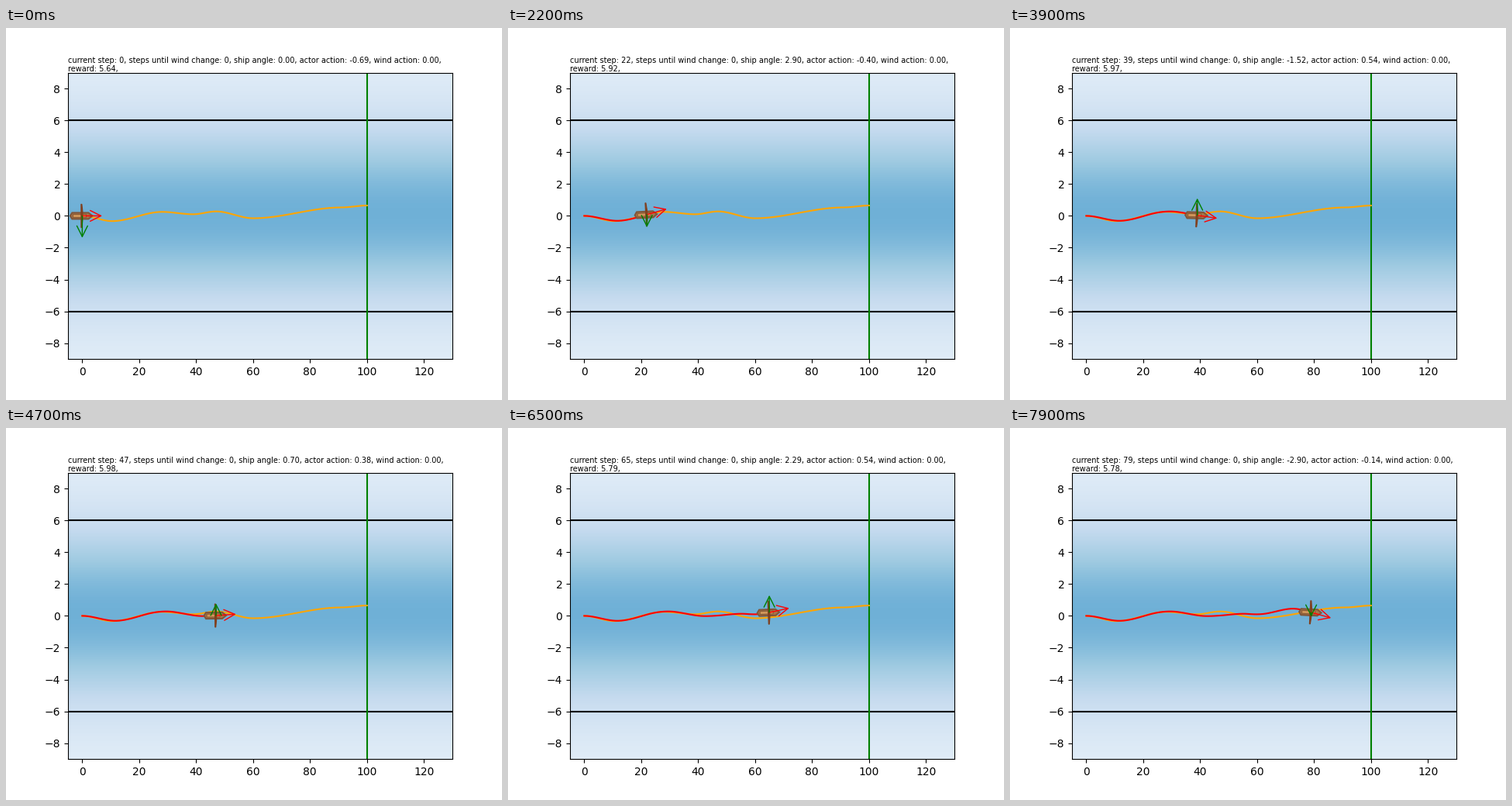
Animation, 640 px wide and 480 px high, one loop 8000 ms. Source, as a matplotlib script:

```python
import numpy as np
import matplotlib.pyplot as plt
from matplotlib.animation import FuncAnimation
from matplotlib.patches import FancyArrowPatch, Polygon

STEPS = 80
PX = np.array([135 / 496, 18 / 369.6])  # data units per pixel

# Key poses: step, height, heading in degrees, rudder action
KEYS = np.array([
    (0, 0, 0, -.69), (12, -.31, .27, .55), (22, .08, 2.9, -.4),
    (32, .25, -1.29, -.86), (40, .01, -1.2, .6), (47, .02, .7, .38),
    (57, .12, -.83, -.7), (63, .14, 1.6, .7), (72, .45, .59, -.53),
    (79, .22, -2.9, -.14)])

# Turning points of the planned route
TURNS = np.array([(0, 0), (10.5, -.33), (28, .25), (39, .1), (47, .28),
                  (60, -.15), (91, .53), (100, .65)])


def curve(t, x, y, slope=None):
    """Cubic through (x, y); without slopes it eases from point to point."""
    m = np.zeros(len(x)) if slope is None else slope
    i = np.clip(np.searchsorted(x, t, side="right") - 1, 0, len(x) - 2)
    h = x[i + 1] - x[i]
    u = (t - x[i]) / h
    rise, p, q = y[i + 1] - y[i], m[i] * h, m[i + 1] * h
    c2, c3 = 3 * rise - 2 * p - q, p + q - 2 * rise
    return y[i] + u * (p + u * (c2 + u * c3)), (p + u * (2 * c2 + 3 * u * c3)) / h


steps = np.arange(STEPS)
key, key_y, key_angle, key_action = KEYS.T
height, slope = curve(steps, key, key_y, np.tan(np.radians(key_angle)))
angle = np.degrees(np.arctan(slope))
action = curve(steps, key, key_action)[0]
reward = 6 - np.abs(height)
reward[0] = 5.64  # left over from the previous run

fig, ax = plt.subplots(figsize=(6.4, 4.8), dpi=100)
fig.subplots_adjust(left=.125, right=.9, bottom=.11, top=.88)

depth = np.linspace(-9, 9, 370)
water = .09 + .4 * np.exp(-(depth - .12) ** 2 / 31)
ax.imshow(water[:, None], cmap="Blues", vmin=0, vmax=1, origin="lower",
          extent=(-5, 130, -9, 9), aspect="auto")
ax.set(xlim=(-5, 130), ylim=(-9, 9))

for y in (-6, 6):
    ax.axhline(y, color="black", lw=1.5)
ax.axvline(100, color="green", lw=1.5)

route = np.linspace(0, 100, 101)
ax.plot(route, curve(route, *TURNS.T)[0], color="orange", lw=1.5)
trail, = ax.plot([], [], color="red", lw=1.5)


def part(points, face, edge, lw):
    """Ship part, given in pixels around the ship's position."""
    patch = Polygon(points, closed=True, fc=face, ec=edge, lw=lw, zorder=4)
    return ax.add_patch(patch), np.array(points)


def arrow(color):
    return ax.add_patch(FancyArrowPatch(
        (0, 0), (1, 0), arrowstyle="->", mutation_scale=25,
        shrinkA=0, shrinkB=0, color=color, zorder=5))


ship = [
    part([(-15.5, 0), (-13, 4), (8, 4), (13, 0), (8, -4), (-13, -4)],
         "#a8754a", "#80563a", 1.5),
    part([(-12, 2), (5, 2), (5, -2), (-12, -2)], "#d0965a", "#8b5a33", .8),
    part([(-1.5, 15), (-.5, 15), (.5, 6), (.5, -6), (-.5, -15), (-1.5, -15)],
         "#80401f", "#80401f", .8),
]
heading, rudder = arrow("red"), arrow("green")
label = ax.text(0, 1, "", transform=ax.transAxes, fontsize=7, va="bottom",
                linespacing=1.075)


def update(n):
    pos = np.array([n, height[n]])
    rad = np.radians(angle[n])
    c, s = np.cos(rad), np.sin(rad)
    for patch, points in ship:
        patch.set_xy(pos + points @ np.array([[c, s], [-s, c]]) * PX)
    trail.set_data(steps[:n + 1], height[:n + 1])
    heading.set_positions(pos, pos + 7 * np.array([c, s]))
    rudder.set_positions(pos, pos + np.array([0, 2 * action[n]]))
    label.set_text(
        f"current step: {n}, steps until wind change: 0, "
        f"ship angle: {angle[n]:.2f}, actor action: {action[n]:.2f}, "
        f"wind action: 0.00,\nreward: {reward[n]:.2f},")


anim = FuncAnimation(fig, update, frames=STEPS, interval=100,
                     repeat=True, repeat_delay=0)
plt.show()
```
